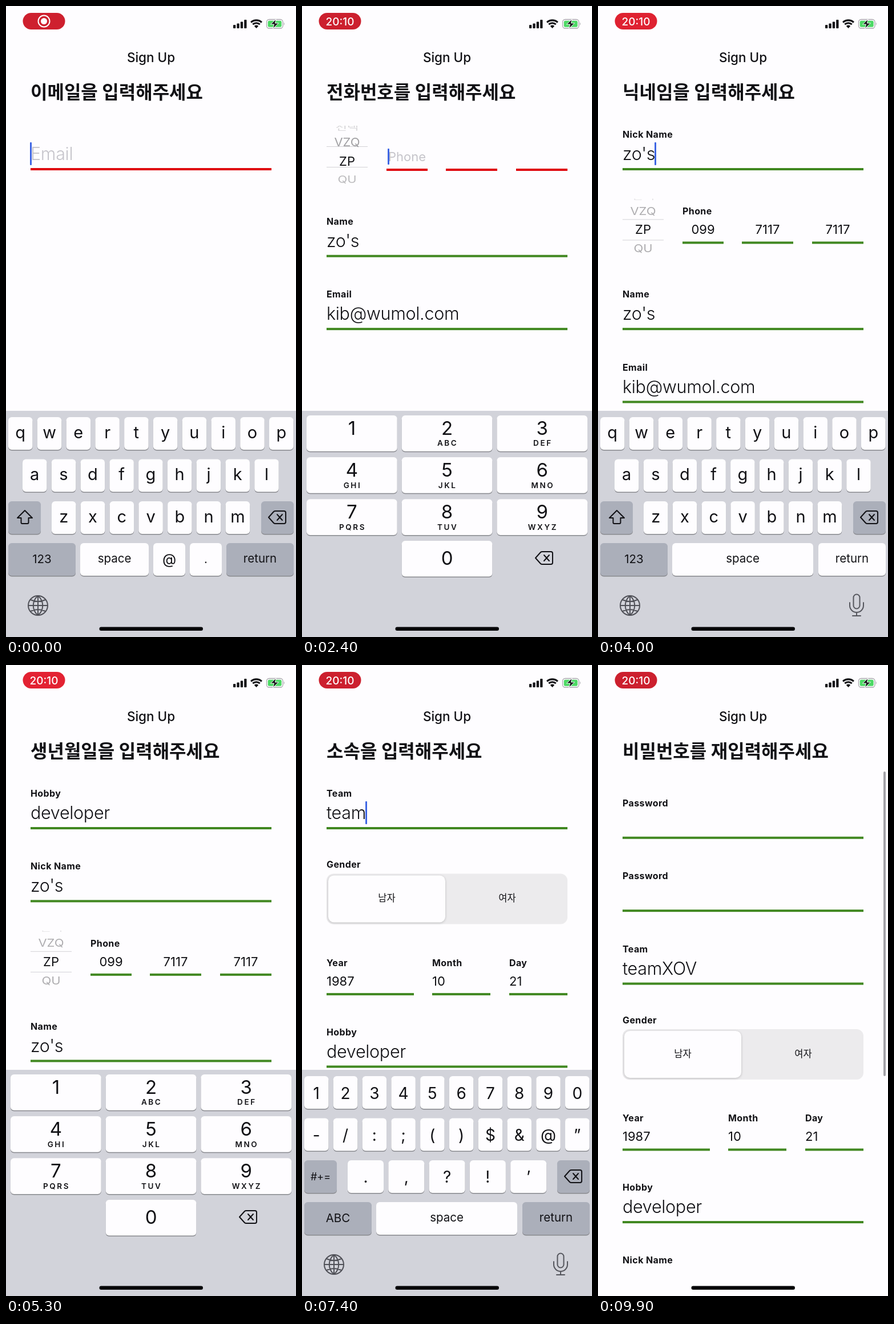
An HTML page that plays this animation: 508x1102 px, repeating every 10 s.

```html
<!DOCTYPE html>
<html lang="ko">
<head>
<meta charset="utf-8">
<title>Sign Up</title>
<style>
  html, body { margin: 0; width: 100%; height: 100%; overflow: hidden; background: #fefdff; }
  body, svg text { font-family: Inter, "Noto Sans CJK KR", "Noto Sans CJK", sans-serif; }
  body { position: relative; color: #111115; }
  div, svg { position: absolute; }
  svg { left: 0; top: 0; width: 508px; height: 1102px; }
  .text { white-space: pre; height: 40px; line-height: 40px; margin-top: -20px; }
  #nav { left: 0; width: 508px; top: 90px; text-align: center; font-size: 22.5px; font-weight: 500; }
  #title { left: 43px; top: 150.5px; font-size: 32px; font-weight: 700; }
  #list { left: 0; top: 186px; width: 508px; height: 860px; overflow: hidden; }
  .row { left: 0; top: 12px; width: 508px; }
  .label { font-size: 16px; font-weight: 700; letter-spacing: .4px; }
  .line { height: 4px; }
  .big { font-size: 30.5px; font-weight: 300; letter-spacing: -.01em; }
  .small { font-size: 22px; }
  .hint { color: #c5c4ca; }
  .caret { display: inline-block; position: relative; width: 0; height: 0; }
  .caret::before { content: ""; position: absolute; left: -1px; width: 3px; border-radius: 1px; background: #3e66e4; }
  .big .caret::before { height: 40px; top: -31px; }
  .small .caret::before { height: 28px; top: -22px; }
  .picker { left: 43px; width: 72px; top: 11px; height: 108px; overflow: hidden; }
  .picker .rule { width: 72px; height: 1.5px; background: #d3d2d6; }
  .picker .text { top: 54px; width: 72px; text-align: center; font-size: 22px; }
  .segment { left: 43px; top: 38.5px; width: 422px; height: 88px; border-radius: 12px; background: #ecebed; }
  .segment .knob { left: 3px; top: 3px; width: 205px; height: 82px; border-radius: 10px; background: #fefdff; box-shadow: 0 1px 4px #0003; }
  .segment .text { top: 43px; width: 211px; text-align: center; font-size: 16.5px; }
  #bar { left: 500px; width: 4px; border-radius: 2px; background: #a3a2a7; }
</style>
</head>
<body>
<div id="nav" class="text">Sign Up</div>
<div id="title" class="text"></div>
<div id="list"></div>
<div id="bar"></div>
<svg id="overlay" viewBox="0 0 508 1102"></svg>
<script>
const LOOP = 10000, TICK = 100;
const $ = id => document.getElementById(id);
const clamp = v => Math.min(1, Math.max(0, v));
const ease = (t, from, to) => { const p = clamp((t - from) / (to - from)); return p * p * (3 - 2 * p); };

// Form layout: row height and the offsets of label, text and underline inside a row
const layouts = {
  big: { height: 127.4, label: 26, text: 60, line: 86.5, font: 'big' },
  phone: { height: 151.7, label: 32.5, text: 65, line: 88, font: 'small' },
  birth: { height: 115.6, label: 21, text: 52.5, line: 76, font: 'small' },
  gender: { height: 173.5 }
};
const field = (label, need, parts, x = 43, width = 422) => ({ label, need, parts, x, width });
const ask = (what, verb = '입력') => `${what} ${verb}해주세요`;

const steps = [
  { start: -1000, title: ask('이메일을'), kind: 'big', fields: [field('Email', 13, [[100, 1000, 'kib@wumol.com']])] },
  { start: 1200, title: ask('이름을'), kind: 'big', fields: [field('Name', 2, [[1300, 1800, "zo's"]])] },
  { start: 1900, title: ask('전화번호를'), kind: 'phone', fields: [
    field('Phone', 3, [[2400, 2700, '099']], 148, 72),
    field('', 4, [[2700, 2900, '7117']], 252, 90),
    field('', 4, [[2900, 3100, '7117']], 375, 90)] },
  { start: 3100, title: ask('닉네임을'), kind: 'big', fields: [field('Nick Name', 2, [[3400, 3900, "zo's"]])] },
  { start: 4200, title: ask('취미를'), kind: 'big', fields: [field('Hobby', 2, [[4400, 5200, 'developer']])] },
  { start: 5300, title: ask('생년월일을'), kind: 'birth', fields: [
    field('Year', 4, [[5500, 5800, '1987']], 43, 153),
    field('Month', 2, [[5900, 6100, '10']], 228, 102),
    field('Day', 2, [[6200, 6400, '21']], 363, 102)] },
  { start: 6500, title: ask('성별을', '선택'), kind: 'gender', fields: [] },
  { start: 6800, title: ask('소속을'), kind: 'big', fields: [field('Team', 2, [[7000, 7300, 'team'], [7400, 7700, 'XOV']])] },
  { start: 7900, title: ask('비밀번호를'), kind: 'big', secure: true, fields: [field('Password', 8, [[8000, 8300, '********']])] },
  { start: 8400, title: ask('비밀번호를', '재입력'), kind: 'big', secure: true, fields: [field('Password', 8, [[8500, 8700, '********']])] }
];
const carriers = ['선택', 'VZQ', 'ZP', 'QU'];

function add(parent, className, text = '', style = {}) {
  const node = document.createElement('div');
  node.className = className;
  node.textContent = text;
  Object.assign(node.style, style);
  return parent.appendChild(node);
}

for (const step of steps) {
  const layout = step.layout = layouts[step.kind];
  const row = step.row = add($('list'), 'row');
  for (const f of step.fields) {
    const left = f.x + 'px', width = f.width + 'px';
    f.labelNode = add(row, 'text label', f.label, { left, top: layout.label + 'px' });
    f.textNode = add(row, 'text ' + layout.font, '', { left, width, top: layout.text + 'px' });
    f.lineNode = add(row, 'line', '', { left, width, top: layout.line - 2 + 'px' });
  }
  if (step.kind === 'phone') {
    const picker = add(row, 'picker');
    for (const top of ['35.5px', '71.5px']) add(picker, 'rule', '', { top });
    step.carriers = carriers.map(name => add(picker, 'text', name));
  }
  if (step.kind === 'gender') {
    add(row, 'text label', 'Gender', { left: '43px', top: '22.5px' });
    const segment = add(row, 'segment');
    add(segment, 'knob');
    add(segment, 'text', '남자');
    add(segment, 'text', '여자', { left: '211px' });
  }
}

// Keyboard and status bar drawing
const GRAY = '#abafba', WHITE = '#fefdff';
const label = (x, y, size, text, extra = '') =>
  `<text x="${x}" y="${y + size * .364}" font-size="${size}" text-anchor="middle" ${extra}>${text}</text>`;
const key = (x, y, w, text = '', { size = 20.5, dy = 28, fill = WHITE, h = 57, cls = '' } = {}) =>
  `<rect x="${x}" y="${y + 1.5}" width="${w}" height="${h}" rx="6" fill="#88898e"/>
   <rect class="${cls}" x="${x}" y="${y}" width="${w}" height="${h}" rx="6" fill="${fill}"/>` +
  label(x + w / 2, y + dy, size, text);
const keyRow = (chars, x, y, options, w = 42.5, pitch = 50.78) =>
  [...chars].map((c, i) => key(x + i * pitch, y, w, c === '&' ? '&amp;' : c, options)).join('');
const stroke = (d, x, y, width = 2, color = '#111115') =>
  `<path d="${d}" transform="translate(${x} ${y})" fill="none" stroke="${color}" stroke-width="${width}" stroke-linecap="round" stroke-linejoin="round"/>`;
const erase = (x, y) => stroke('M-15 0L-6-10Q-5-11-3-11H12Q15-11 15-8V8Q15 11 12 11H-3Q-5 11-6 10ZM0-5L9 5M9-5L0 5', x, y);
const globe = stroke('M-17 0A17 17 0 1 0 17 0A17 17 0 1 0-17 0H17M0-17V17M0-17C-11-8-11 8 0 17C11 8 11-8 0-17M-13-10Q0-4 13-10M-13 10Q0 4 13 10', 56, 1047, 2, '#505158');
const mic = stroke('M-5.5-13A5.5 5.5 0 0 1 5.5-13V1A5.5 5.5 0 0 1-5.5 1ZM-12-4V1A12 12 0 0 0 12 1V-4M0 13V19M-7 19H7', 453, 1046, 2, '#55565d');
const gray = { fill: GRAY };

const letterRows = keyRow('qwertyuiop', 4, 718, { size: 29, dy: 26 }) +
  keyRow('asdfghjkl', 29, 791.5, { size: 29, dy: 26 }) +
  keyRow('zxcvbnm', 80, 865, { size: 29, dy: 26 }) +
  key(4, 865, 57, '', gray) + stroke('M0-12L13 1H6.5V9Q6.5 11 4.5 11H-4.5Q-6.5 11-6.5 9V1H-13Z', 33, 893);
const eraseKey = key(447, 865, 57, '', gray) + erase(475, 893);
const modeKey = name => key(4, 938, 118, name, gray);
const returnKey = cls => key(386, 938, 118, 'return', { fill: GRAY, cls, dy: 27 });
const space = w => key(130, 938, w, 'space', { dy: 27 });

const padKeys = ['', 'ABC', 'DEF', 'GHI', 'JKL', 'MNO', 'PQRS', 'TUV', 'WXYZ'].map((letters, i) => {
  const x = 8 + i % 3 * 166.7, y = 715 + Math.floor(i / 3) * 73.1;
  return key(x, y, 158.7, i + 1, { size: 33, dy: 22.2, h: 62.7 }) +
    label(x + 80.5, y + 48.5, 13.5, letters, 'font-weight="600" letter-spacing="2.6"');
}).join('');

const planes = {
  email: letterRows + eraseKey + modeKey('123') + space(120) + key(258, 938, 56, '@', { size: 25 }) +
    key(322, 938, 56, '.') + returnKey('') + globe,
  letters: letterRows + eraseKey + modeKey('123') + space(247) + returnKey('return') + globe + mic,
  nums: keyRow('1234567890', 4, 718, { size: 28, dy: 29.5 }) + keyRow('-/:;()$&@”', 4, 791.5, { size: 28, dy: 29 }) +
    keyRow('.,?!’', 80, 865, { size: 28, dy: 29 }, 63, 71.3) + key(4, 865, 57, '#+=', { fill: GRAY, size: 18 }) +
    eraseKey + modeKey('ABC') + space(247) + returnKey('') + globe + mic,
  pad: padKeys + key(174.7, 934, 158.7, '0', { size: 33, dy: 29.8, h: 62.5 }) + erase(424, 964)
};
const signal = [6, 8.5, 11.5, 15].map((h, i) =>
  `<rect x="${398 + i * 6.4}" y="${39 - h}" width="4.3" height="${h}" rx="1"/>`).join('');
const wifi = `<g transform="translate(438.5 39)">
  <path d="M-9.4-10.4A14 14 0 0 1 9.4-10.4M-6.2-6.9A9.3 9.3 0 0 1 6.2-6.9" fill="none" stroke="#111115" stroke-width="3.2"/>
  <path d="M0 0L-3.7-4.1A5.5 5.5 0 0 1 3.7-4.1Z"/></g>`;
const battery = `<rect x="456.5" y="23.5" width="28.5" height="15.5" rx="4.5" fill="none" stroke="#a9a8ad" stroke-width="1.3"/>
  <path d="M486.8 28.5Q489 31.2 486.8 34Z" fill="#a9a8ad"/>
  <rect x="458.7" y="25.7" width="24" height="11" rx="2.5" fill="#4cd964"/>
  <path d="M473 23L463.5 32H469.5L467.5 39.5L477.5 30H471.5Z" stroke="#fff" stroke-width="1"/>`;

$('overlay').innerHTML = `<g fill="#111115">
  <rect id="pill" x="29.5" y="12" width="74" height="29" rx="14.5"/>
  <g id="clock" fill="#fff">${label(66.5, 26.8, 19, '20:10', 'font-weight="500"')}</g>
  <g id="record"><circle cx="66.5" cy="26.5" r="10" fill="none" stroke="#fff" stroke-width="2"/><circle cx="66.5" cy="26.5" r="5.5" fill="#fff"/></g>
  ${signal}${wifi}${battery}
  <g id="keyboard"><rect y="707" width="508" height="395" fill="#d2d3da"/>
    ${Object.entries(planes).map(([name, art]) => `<g id="${name}">${art}</g>`).join('')}</g>
  <rect x="163.5" y="1084.5" width="181.5" height="6.5" rx="3.2" fill="#050507"/></g>`;
const returnFace = document.querySelector('.return');

const keyboardPlan = [[0, 'email'], [1200, 'letters'], [1500, 'nums'], [1600, 'letters'], [1900, 'pad'],
  [3100, 'letters'], [3600, 'nums'], [3800, 'letters'], [5300, 'pad'], [6800, 'letters'], [7400, 'nums'], [7500, 'letters']];

const typed = (f, t) => f.parts.map(([from, to, text]) =>
  text.slice(0, Math.floor(text.length * clamp((t - from) / (to - from)) + 1e-6))).join('');

function drawField(f, step, t, focused) {
  const value = typed(f, t), valid = value.length >= f.need;
  const phone = step.kind === 'phone', node = f.textNode;
  f.labelNode.style.opacity = valid ? 1 : 0;
  f.lineNode.style.background = valid ? '#418821' : '#df040c';
  node.textContent = step.secure ? '' : value;
  node.style.textAlign = phone && value ? 'center' : 'left';
  node.style.textIndent = phone && !value ? '3px' : '0';
  node.classList.toggle('hint', !value);
  if (focused && !step.secure) node.appendChild(document.createElement('span')).className = 'caret';
  if (!value) node.append(f.label);
}

function drawPicker(nodes, t) {
  const position = 1.76 * ease(t, 1900, 2400) + .24 * ease(t, 2400, 2600);
  nodes.forEach((node, i) => {
    const angle = (i - position) * .52, tilt = Math.abs(angle);
    node.style.transform = `translateY(${66 * Math.sin(angle)}px) scaleY(${Math.max(0, Math.cos(angle))})`;
    node.style.opacity = tilt < .27 ? 1 : Math.max(0, .55 - .42 * tilt);
  });
}

function drawForm(t) {
  const active = steps.filter(s => s.start <= t).pop();
  $('title').textContent = active.title;
  let scroll = t > 9100 ? 480 * Math.sin(Math.PI * (t - 9100) / 720) : 0;
  if (scroll < 0) scroll *= .102;
  let y = -scroll;
  for (const step of [...steps].reverse()) {
    const shown = ease(t, step.start, step.start + 300);
    step.row.style.transform = `translateY(${y}px)`;
    step.row.style.opacity = shown;
    y += shown * step.layout.height;
    const focus = step === active && (step.fields.find(f => typed(f, t).length < f.need) || step.fields[step.fields.length - 1]);
    step.fields.forEach(f => drawField(f, step, t, f === focus));
    if (step.carriers) drawPicker(step.carriers, t);
  }
  Object.assign($('bar').style, {
    opacity: t > 9100 ? 1 : 0,
    top: 186 + Math.max(0, scroll) * .635 + 'px',
    height: 549 + Math.min(0, scroll) + 'px'
  });
  return active;
}

function drawKeyboard(t, active) {
  const plane = keyboardPlan.filter(([from]) => from <= t).pop()[1];
  for (const name in planes) $(name).style.display = name === plane ? '' : 'none';
  const hidden = ease(t, 6500, 6800) - ease(t, 6800, 7100) + ease(t, 7900, 8200);
  $('keyboard').setAttribute('transform', `translate(0 ${hidden * 397})`);
  returnFace.setAttribute('fill', active.fields[0] && typed(active.fields[0], t) ? WHITE : GRAY);
}

function drawPill(t) {
  const glow = .5 - .5 * Math.cos(2 * Math.PI * (t - 9900) / 1250);
  $('pill').setAttribute('fill', `rgb(${204 + 32 * glow},${32 + 3 * glow},${46 + 5 * glow})`);
  const clock = ease(t, 100, 400);
  $('clock').style.opacity = clock;
  $('record').style.opacity = 1 - clock;
}

const began = performance.now();
function render() {
  const t = Math.floor((performance.now() - began) % LOOP / TICK) * TICK;
  drawKeyboard(t, drawForm(t));
  drawPill(t);
  requestAnimationFrame(render);
}
render();
</script>
</body>
</html>
```
